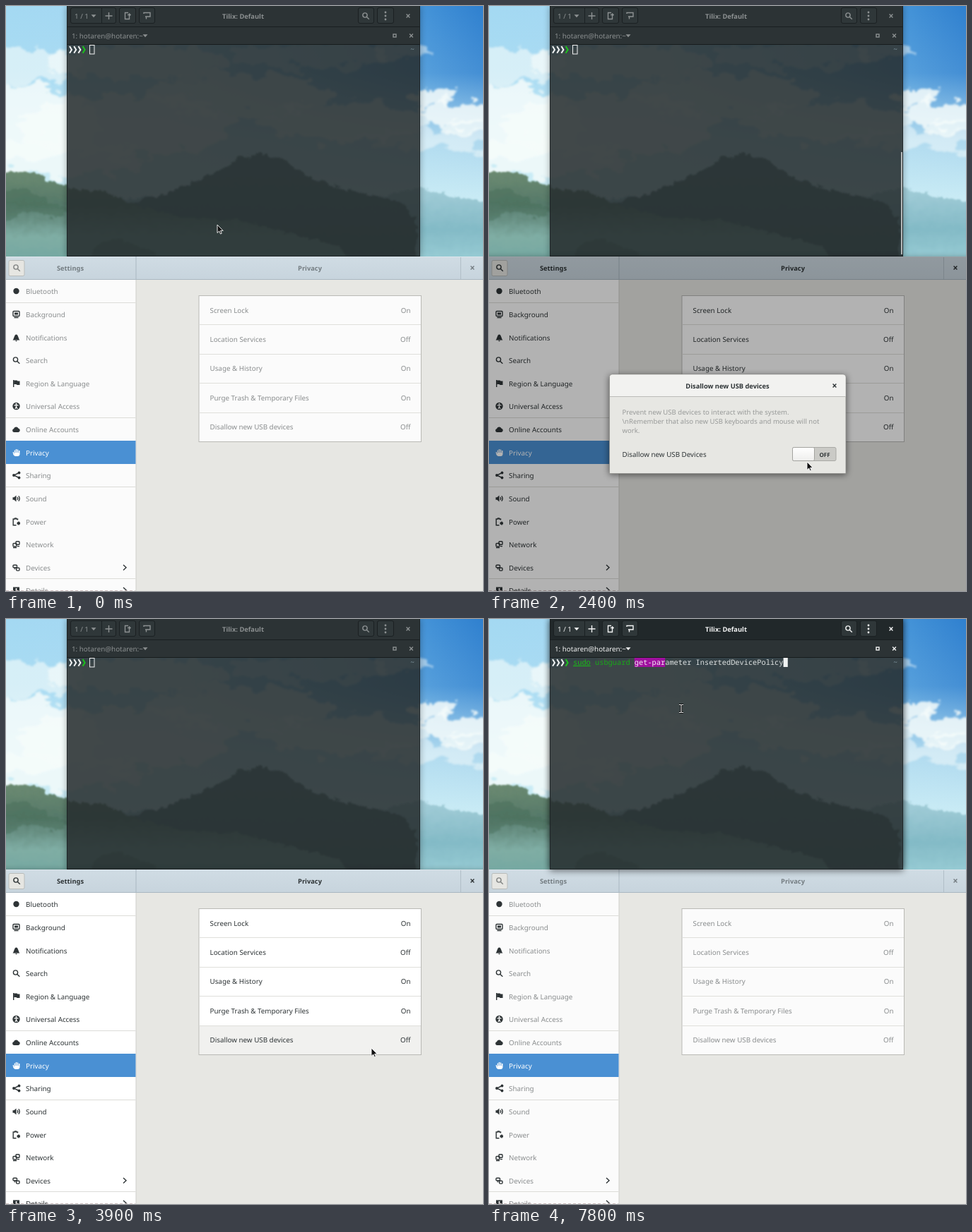
An HTML page that plays this animation: 675 px wide and 829 px high, repeating every 8 s.

```html
<!DOCTYPE html>
<html lang="en">
<head>
<meta charset="utf-8">
<title>USB device settings</title>
<style>
html, body { margin: 0; width: 100%; height: 100%; overflow: hidden; background: #e7e7e3 }
svg { display: block; width: 675px; height: 829px; font: 9.82px "Noto Sans", "Open Sans", sans-serif; text-rendering: geometricPrecision }
.b { font-weight: 700; font-size: 9.3px }
.mono { font: 10.33px "Noto Sans Mono", "DejaVu Sans Mono", monospace; white-space: pre }
.line { fill: none; stroke: currentColor; stroke-width: 1.4 }
</style>
</head>
<body>
<svg id="stage" viewBox="0 0 675 829"></svg>
<script>
const LOOP = 8000, CELL = 6.2;
const INK = '#2e3436', PAPER = '#e7e7e3';

const rect = (x, y, w, h, fill, more = '') => `<rect x="${x}" y="${y}" width="${w}" height="${h}" fill="${fill}" ${more}/>`;
const path = (d, more = '') => `<path d="${d}" ${more}/>`;
const line = (d, more = '') => path(d, 'class="line" ' + more);
const text = (x, y, s, more = '') => `<text x="${x}" y="${y + 3.5}" ${more}>${s}</text>`;
const group = (id, body, more = '') => `<g id="${id}" ${more}>${body}</g>`;
const at = (x, y, body) => `<g transform="translate(${x} ${y})">${body}</g>`;
const middle = 'text-anchor="middle"', end = 'text-anchor="end"';
const cross = (x, y) => line(`M${x - 2.4} ${y - 2.4}l4.8 4.8m0-4.8l-4.8 4.8`);
const down = (x, y) => path(`M${x - 3.5} ${y - 1.8}h7l-3.5 4z`, 'fill="currentColor"');
const lens = line('M1.4 1.4L4.8 4.8') + '<circle class="line" cx="-1" cy="-1" r="3.1"/>';

const gradient = (id, stops, dir = 'x2="0" y2="1"') => `<linearGradient id="${id}" ${dir}>` +
  stops.map((c, i) => `<stop offset="${i / (stops.length - 1)}" stop-color="${c}"/>`).join('') + '</linearGradient>';

const defs = `<defs>
  ${gradient('sky', ['#a4d9f2', '#a4d7f3', '#66b2e6', '#2f80cf'], 'x2="1" y2="0"')}
  ${gradient('haze', ['#cdeef600', '#cdeef622', '#cdeef6cc', '#cdeef6'])}
  ${gradient('far', ['#a3cdd8', '#83bac6', '#9fd2d9'])}
  ${gradient('peak', ['#56777c', '#4e7074', '#456566'])}
  ${gradient('hill', ['#6b8a70', '#56796a', '#7fada4', '#6fa5a0'])}
  ${gradient('bar', ['#d0dce4', '#c7d4dd'])}
  ${gradient('knob', ['#ffffff', '#eeeeec'])}
  <filter id="paint" x="-20%" y="-20%" width="140%" height="140%">
    <feTurbulence type="fractalNoise" baseFrequency=".035 .06" numOctaves="4" seed="8"/>
    <feDisplacementMap in="SourceGraphic" scale="42" xChannelSelector="R" yChannelSelector="G"/>
    <feGaussianBlur stdDeviation="1.6"/>
  </filter>
  <filter id="rough" x="-5%" y="-10%" width="110%" height="120%">
    <feTurbulence type="fractalNoise" baseFrequency=".09" numOctaves="3" seed="3"/>
    <feDisplacementMap in="SourceGraphic" scale="13" xChannelSelector="R" yChannelSelector="G"/>
    <feGaussianBlur stdDeviation=".8"/>
  </filter>
  <filter id="shadow" x="-20%" y="-20%" width="140%" height="140%"><feGaussianBlur stdDeviation="5"/></filter>
  <clipPath id="top"><rect width="675" height="355"/></clipPath>
  <clipPath id="around"><path clip-rule="evenodd" d="M0 0H675V829H0ZM86 0V355H586V0Z"/></clipPath>
</defs>`;

// Clouds: centre, radii, opacity
const clouds = [
  [20, 85, 90, 24, .6], [10, 165, 120, 55, .85], [170, 170, 150, 45, .8], [190, 80, 130, 24, .6],
  [330, 125, 130, 30, .7], [430, 70, 110, 18, .45], [480, 165, 120, 28, .7], [640, 152, 50, 17, .85],
  [602, 130, 32, 13, .85], [665, 172, 48, 13, .8], [600, 190, 100, 15, .5], [562, 66, 44, 9, .5], [60, 215, 130, 26, .8]
].map(([x, y, a, b, o]) => `<ellipse cx="${x}" cy="${y}" rx="${a}" ry="${b}" fill="#f6fcfb" opacity="${o}"/>`).join('');

const wallpaper = `<g clip-path="url(#top)">
  ${rect(0, 0, 675, 355, 'url(#sky)')}${rect(0, 0, 675, 285, 'url(#haze)')}${rect(0, 285, 675, 70, '#cdeef6')}
  <g filter="url(#paint)">${clouds}</g>
  <g filter="url(#rough)">
    ${path('M-20 375V270L180 272 420 266 520 272 586 258 640 272 695 278V375Z', 'fill="url(#far)"')}
    ${path('M180 375V280L235 262 290 240 330 215 362 208 400 222 440 248 500 264 560 278 580 300V375Z', 'fill="url(#peak)"')}
    ${path('M-20 375V238L20 234 50 242 87 256 140 264 190 284 250 300 330 304 400 322 470 340 500 375Z', 'fill="url(#hill)"')}
    ${path('M-20 375V268L25 258 60 276 95 292 70 300 30 290 0 306ZM110 375L130 336 160 330 200 345 260 375Z', 'fill="#456b58" opacity=".45"')}
  </g></g>`;

const chevron = i => path(`M${90 + i * CELL} 57l3 4.9-3 4.9`,
  `fill="none" stroke="${i < 3 ? '#f2f4f4' : '#1cc41c'}" stroke-width="2"`);
const cellText = (col, s, color, more = '') => `<text class="mono" x="${119 + col * CELL}" y="65" fill="${color}" ${more}>${s}</text>`;

const button = (x, w) => rect(x + .5, 2.5, w, 22, '#2f3739', 'stroke="#1b2022" rx="2.5"');
const terminalShadow = rect(86, 0, 500, 357, '#000', 'filter="url(#shadow)"');
const terminal =
  `<g clip-path="url(#around)" opacity=".35">${terminalShadow}</g>` +
  rect(86, 54, 500, 301, '#272d2f', 'opacity=".87"') +
  rect(86, 0, 500, 54, '#2c3335') + rect(86, 0, 500, 29, '#21282a', 'id="termBar"') +
  rect(86, 29, 500, 1, '#1a1f21') + rect(86, 54, 500, 1, '#171c1d') +
  path('M86.5 0V354.5H585.5V0', 'fill="none" stroke="#1b2123" stroke-opacity=".8"') +
  button(91, 64) + rect(135, 3, 1, 22, '#1b2022') + button(160, 23) + button(188, 22) + button(498, 22) + button(525, 23) +
  group('termInk',
    text(97, 14, '1 / 1') + down(124, 14) + line('M140.5 14h10M145.5 9v10') +
    line('M173 9.5h-4.5v9h6v-4M172 12.5h4m-2-2l2 2-2 2') +
    line('M195 11v-1.5h9v5.5h-4M197 15h3m-1.5 0v3.5') +
    text(335.5, 14, 'Tilix: Default', `class="b" ${middle}`) +
    at(509, 14, lens) + [9, 14, 19].map(y => `<circle cx="537" cy="${y}" r="1.4"/>`).join('') + cross(569, 14) +
    text(93, 42, '1: hotaren@hotaren:~') + down(197, 42) +
    '<rect class="line" x="548" y="40" width="4" height="4" stroke-width="1"/>' + cross(573.5, 42),
    'fill="#f3f4f4" color="#f3f4f4"') +
  [0, 1, 2, 3].map(chevron).join('') +
  `<text class="mono" x="572" y="65" fill="#7b9099">~</text>` +
  group('typed', '') +
  group('command',
    rect(119 + 14 * CELL, 55, 7 * CELL, 13, '#a0109f') +
    cellText(0, 'sudo', '#18b818', 'text-decoration="underline"') + cellText(5, 'usbguard', '#18a818') +
    cellText(14, 'get-par', '#f4f0f4') + cellText(21, 'ameter InsertedDevicePolicy', '#dfe3e3')) +
  rect(118.5, 55.5, 6.5, 12.5, 'none', 'id="hollow" stroke="#f0f2f2"') +
  rect(119, 55, 6.2, 13, '#f0f2f2', 'id="block"') +
  rect(583, 207, 2, 145, '#b4b8b8', 'id="scroll"');

const screen = (x, y, w, h) => `<rect class="line" x="${x}" y="${y}" width="${w}" height="${h}" rx="1"/>`;
const fill = d => path(d, 'fill="currentColor"');
const items = [
  [404, 'Bluetooth', '<circle r="4.2"/>'],
  [437, 'Background', screen(-4.5, -4.5, 9, 7) + fill('M-2.5-2.5h5v3h-5zM-3 3.8h6v1.4h-6z')],
  [470, 'Notifications', fill('M-5 3.5C-3 2-3-4.5 0-4.5S3 2 5 3.5zM-1.5 4h3l-1.5 1.5z')],
  [502, 'Search', lens],
  [535, 'Region &amp; Language', fill('M-4.5-5h1.4V5h-1.4zM-3-4.5H1l1 1h3V2H1L0 1h-3z')],
  [567, 'Universal Access', '<circle r="5.2"/>' + path('M-3-1.2h6M0-1v2l-1.6 3M0 1l1.6 3', 'stroke="#fff" stroke-width="1.2" fill="none"') + '<circle cy="-3.1" r="1.1" fill="#fff"/>'],
  [600, 'Online Accounts', fill('M-3 4a2.6 2.6 0 0 1-.5-5.1A3.5 3.5 0 0 1 3-1.5 2.8 2.8 0 0 1 3 4z')],
  [633, 'Privacy', fill('M-4.8-1h1.4v2h.7v-4.5h1.3V0h.7v-5H.7v5h.7v-4.5h1.3V0h.7v-3H5V2.5Q4.5 5 2 5h-3.5Q-4.8 4-4.8-1z')],
  [665, 'Sharing', line('M4-3.5L-3.5 0 4 3.5') + [[4, -3.5], [-3.5, 0], [4, 3.5]].map(([x, y]) => `<circle cx="${x}" cy="${y}" r="1.9"/>`).join('')],
  [698, 'Sound', fill('M-5-1.7h2L0-4.5v9L-3 1.7h-2z') + line('M1.5-2q1.5 2 0 4M3.3-3.6q2.8 3.6 0 7.2', 'stroke-width="1.2"')],
  [731, 'Power', line('M2-2.5V-4H0v-1h-2v1h-2.3V4.8H0') + fill('M1 1l3-2v1.5h1.5v3H4V5L1 3z')],
  [763, 'Network', screen(-.5, -4.2, 5, 4.5) + screen(-4.5, -1.5, 5, 4.5) + fill('M-4.5 4h5v1.2h-5zM1.5 2h3v1.2h-3z')],
  [796, 'Devices', screen(-4.5, -3.8, 5.5, 3.5) + fill('M-3 .5h2v1.7h-2z') + screen(.2, .3, 4.3, 3.8)],
  [828, 'Details', fill('M-4.5-4.5h9v9h-9z') + rect(-.8, -3, 1.6, 4, '#fff')]
];
const options = ['Screen Lock On', 'Location Services Off', 'Usage &amp; History On', 'Purge Trash &amp; Temporary Files On', 'Disallow new USB devices Off'];
const ROW = 41.4, LIST = 410.5;

const settings =
  `<g clip-path="url(#top)">${group('settingsShadow', rect(-20, 357, 715, 472, '#000', 'filter="url(#shadow)"'))}</g>` +
  rect(0, 355, 675, 474, PAPER) + rect(0, 388, 184, 441, '#fff', 'class="paper"') +
  rect(0, 355, 675, 33, 'url(#bar)') + rect(0, 355, 675, 1, '#dbe5eb') + rect(0, 387, 675, 1, '#a9b7c1') +
  rect(183.5, 355, 1, 33, '#a9b7c1') + rect(183.5, 388, 1, 441, '#d0d0cc') + rect(643, 356, 1, 31, '#b1bec7') +
  rect(4, 360.5, 22, 22, '#e6e6e2', 'stroke="#b9bcba" rx="2"') +
  [420, 583, 681, 811].map(y => rect(0, y, 183.5, 1, '#dcdcd8')).join('') +
  rect(0, 616, 183.5, 33, '#4a90d3') +
  rect(273, LIST, 314.5, 207, '#fff', 'class="paper"') +
  rect(273.5, LIST, 313.5, ROW, '#f1f1ef', 'id="hover"') +
  rect(273, LIST, 314.5, 207, 'none', 'stroke="#b9b9b5"') +
  [1, 2, 3, 4].map(i => rect(273.5, Math.round(LIST + i * ROW - .5), 313.5, 1, '#dfdfdb')).join('') +
  items.map(([y, , icon]) => `<g transform="translate(14.5 ${y})" color="${y === 633 ? '#fff' : INK}" fill="${y === 633 ? '#fff' : INK}">${icon}</g>`).join('') +
  line('M166 792l4 3.7-4 3.7M166 824l4 3.7-4 3.7', `color="${INK}"`) +
  path('M0 828.5H183', 'stroke="#cfc0c0" stroke-dasharray="4 3"') +
  text(28, 633, 'Privacy', 'fill="#fff"') +
  group('ink',
    items.filter(([y]) => y !== 633).map(([y, s]) => text(28, y, s)).join('') +
    text(91, 371, 'Settings', `class="b" ${middle}`) + text(430, 371, 'Privacy', `class="b" ${middle}`) +
    at(15, 371, lens) + cross(660, 371) +
    options.map((s, i) => {
      const cut = s.lastIndexOf(' '), y = 431 + i * ROW;
      return text(288.5, y, s.slice(0, cut)) + text(572.5, y, s.slice(cut + 1), end);
    }).join(''), `fill="${INK}" color="${INK}"`) +
  rect(0, 355, 675, 474, '#000', 'id="dim"');

// The focused terminal also shades the window below it
const raised = `<g clip-path="url(#around)">${group('raised', terminalShadow)}</g>`;

const dialog = group('dialog',
  rect(170, 524, 335.5, 140, '#000', 'opacity=".55" filter="url(#shadow)"') +
  path('M170.5 662.5V526q0-4 4-4H501q4 0 4 4V662.5Z', `fill="${PAPER}" stroke="#8f8f8b" stroke-width=".8"`) +
  path('M171 553V526q0-3.5 3.5-3.5H501q3.5 0 3.5 3.5V553Z', 'fill="#f2f2f0"') + rect(171, 553, 333.5, 1, '#bcbcb8') +
  text(337.5, 538, 'Disallow new USB devices', `class="b" ${middle}`) + cross(489, 538) +
  ['Prevent new USB devices to interact with the system.', '\\nRemember that also new USB keyboards and mouse will not', 'work.']
    .map((s, i) => text(188.5, 575 + i * 13.2, s, 'fill="#989a99" font-size="9.55"')).join('') +
  text(188.5, 635, 'Disallow new USB Devices') +
  rect(429.5, 625.5, 61.5, 19, '#cacac6', 'stroke="#a9a9a5" rx="2"') +
  rect(429.5, 625.5, 31, 19, 'url(#knob)', 'stroke="#a3a39f" rx="2"') +
  text(475, 635, 'OFF', `class="b" style="font-size:8px" ${middle}`),
  `fill="${INK}" color="${INK}"`);

const BEAM = 'M-3 .5h2.5l.5 .7 .5-.7H3M0 1V11M-3 11.5h2.5l.5-.7 .5 .7H3';
const pointers =
  group('arrow', path('M0 0V11.5L2.7 9 4.5 13 6.3 12.2 4.6 8.4H8.2Z', 'fill="#111" stroke="#fff" stroke-width=".9"')) +
  group('beam', path(BEAM, 'fill="none" stroke="#000" stroke-width="2.6"') + path(BEAM, 'fill="none" stroke="#fff"'));

stage.innerHTML = defs + wallpaper + terminal + settings + raised + dialog + pointers;
const el = id => document.getElementById(id);
const set = (id, name, value) => el(id).setAttribute(name, value);
const show = (id, opacity) => set(id, 'opacity', Number(opacity));

const ramp = (t, from, to) => Math.min(1, Math.max(0, (t - from) / (to - from)));
const easeOut = p => 1 - (1 - p) ** 2;

// Pointer path: time, x, y
const track = [
  [0, 299, 310], [300, 299, 310], [500, 240, 350], [700, 300, 480], [900, 338, 591], [1000, 338, 591], [1100, 338, 597],
  [1900, 338, 597], [2000, 280, 611], [2100, 280, 611], [2200, 406, 645], [2300, 406, 645], [2400, 450, 646],
  [2500, 455, 640], [3000, 490, 538], [3700, 490, 538], [3900, 517, 608], [4200, 517, 608], [4700, 272, 121], [LOOP, 272, 121]
];
function pointer(t) {
  const i = track.findIndex(k => k[0] > t), [t0, x0, y0] = track[i - 1], [t1, x1, y1] = track[i];
  const p = (t - t0) / (t1 - t0);
  return [x0 + (x1 - x0) * p, y0 + (y1 - y0) * p];
}

const query = 'get-par', keys = [5500, 5600, 5700, 5800, 6100, 6200, 6400], RECALL = 6700;

function draw(t) {
  const termFocus = ramp(t, 4700, 4900);
  const focus = ramp(t, 1000, 1200) - termFocus;
  const opening = easeOut(ramp(t, 1333, 1433)) * (1 - easeOut(ramp(t, 3575, 3675)));
  const [x, y] = pointer(t);

  show('termBar', termFocus);
  show('termInk', .48 + .52 * termFocus);
  show('raised', .5 * termFocus);
  show('settingsShadow', .4 * focus);
  show('scroll', ramp(t, 400, 600) - ramp(t, 2400, 2700) + ramp(t, 4500, 4700) - ramp(t, 6400, 6800));

  const typed = keys.filter(k => k <= t).length, recalled = t >= RECALL;
  const column = recalled ? 48 : typed;
  el('typed').innerHTML = recalled ? '' : cellText(0, query.slice(0, typed), '#d8302f');
  show('command', recalled);
  const blink = (t >= 5200 && t < 5400) || (t >= 7300 && t < 7800);
  show('hollow', termFocus === 0);
  show('block', termFocus > 0 && !blink);
  set('block', 'x', 119 + column * CELL);

  show('ink', .55 + .45 * focus);
  stage.querySelectorAll('.paper').forEach(p => p.setAttribute('fill-opacity', .85 + .15 * focus));
  const row = Math.floor((y - LIST) / ROW);
  show('hover', focus > 0 && opening === 0 && x > 273 && x < 588 && row >= 0 && row < 5);
  set('hover', 'y', LIST + row * ROW);
  show('dim', .3 * (ramp(t, 1333, 1833) - ramp(t, 3575, 3825)));
  show('dialog', opening);
  set('dialog', 'transform', `translate(0 592) scale(1 ${opening}) translate(0 -592)`);

  const overTerminal = t > 4300 && y < 355 && y > 54;
  show('arrow', !overTerminal);
  show('beam', overTerminal);
  set('arrow', 'transform', `translate(${x} ${y})`);
  set('beam', 'transform', `translate(${x} ${y})`);
}

let last = -1;
function tick() {
  const t = Math.floor(performance.now() % LOOP / 100) * 100;
  if (t !== last) draw(last = t);
  requestAnimationFrame(tick);
}
draw(0);
tick();
</script>
</body>
</html>
```
